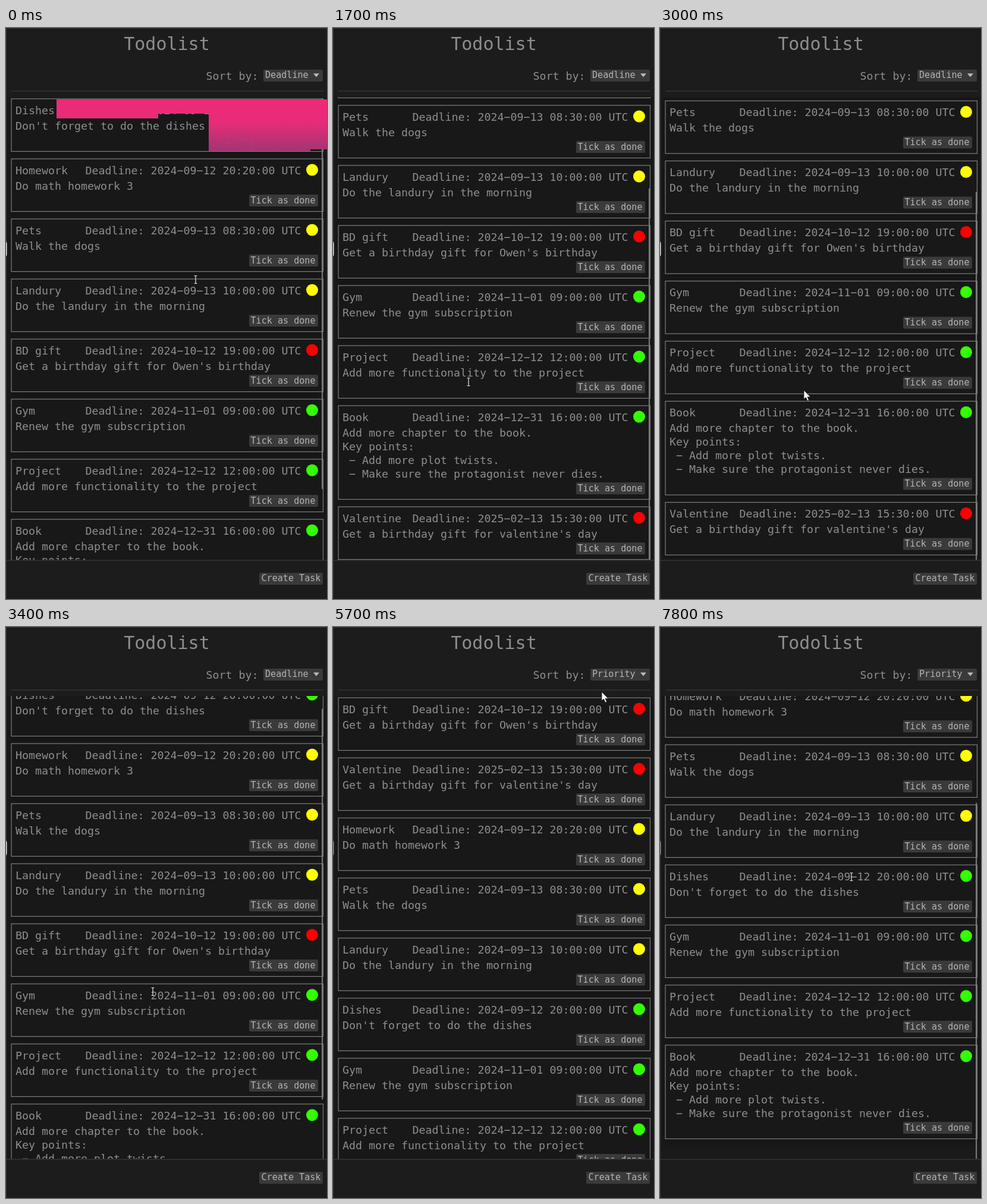
These frames come from a looping animation (540x960 px, 8000 ms). An HTML page:

```html
<!DOCTYPE html>
<html lang="en">
<head>
<meta charset="utf-8">
<title>Todolist</title>
<style>
  html, body { margin: 0; width: 100%; height: 100%; overflow: hidden; background: #1c1c1c; }
  svg { display: block; width: 540px; height: 960px; }
  text { font: 18.27px "DejaVu Sans Mono", monospace; fill: #8e8e8e; white-space: pre; }
  .title { font-size: 30px; text-anchor: middle; }
  .label { font-size: 15.1px; fill: #b4b4b4; }
  .button { fill: #3a3a3a; }
  .frame { fill: #181818; stroke: #7e7e7e; stroke-width: 1.2; filter: drop-shadow(0 5px 6px rgba(0, 0, 0, .25)); }
  .menu text { font: 18px Inter, sans-serif; fill: #e4e4e4; }
</style>
</head>
<body>
<svg viewBox="0 0 540 960">
  <defs>
    <clipPath id="view"><rect y="116" width="540" height="778"/></clipPath>
    <linearGradient id="pink" x1="0" y1="0" x2="0" y2="1">
      <stop offset="0" stop-color="#ee2a78"/>
      <stop offset=".45" stop-color="#e62c78"/>
      <stop offset="1" stop-color="#a03672"/>
    </linearGradient>
  </defs>
  <rect width="540" height="960" fill="#1c1c1c"/>
  <rect y="116" width="540" height="778" fill="#1a1a1a"/>
  <path d="M.5 960V.5H540" fill="none" stroke="#323232"/>
  <path id="notch" d="M0 359q1.5 1 1.5 4v17q0 3-1.5 4z"/>

  <text class="title" x="270.5" y="37">Todolist</text>
  <text x="336.5" y="87">Sort by:</text>
  <rect class="button" x="433" y="70" width="100" height="20" rx="2"/>
  <text class="label" id="choice" x="436" y="84"></text>
  <path d="M517 76.5h10l-5 6z" fill="#bcbcbc"/>
  <path d="M9 106H534" stroke="#343434" stroke-width="1.6"/>

  <g clip-path="url(#view)">
    <g id="list"></g>
    <rect id="thumb" x="531" width="2.2" height="657" rx="1" fill="#777"/>
  </g>

  <path d="M0 895H540" stroke="#343434" stroke-width="1.6"/>
  <rect class="button" x="426" y="916" width="107" height="20" rx="2"/>
  <text class="label" x="429.5" y="930">Create Task</text>

  <g id="glitch">
    <path d="M85 120H540V204H512V207H341V144H256V152H85Z" fill="url(#pink)"/>
  </g>
  <g id="menu" class="menu">
    <rect x="404" y="55.5" width="130" height="76" rx="8" fill="#2b2b2b" stroke="#505050"/>
    <rect id="pick" x="410" width="118" height="31" rx="5" fill="#2a62c8"/>
    <path d="M415 79l4 5 7-11" fill="none" stroke="#e4e4e4" stroke-width="2"/>
    <text x="436" y="85">Deadline</text>
    <text x="436" y="116">Priority</text>
  </g>
  <path id="arrow" d="M0 0V15L3.5 12L6 18L8.5 17L6.2 11.3H11Z" fill="#fff" stroke="#111" stroke-width=".8"/>
  <path id="beam" d="M-2.5-6.5H2.5M0-6.5V6.5M-2.5 6.5H2.5" fill="none" stroke="#e8e8e8" stroke-width="1.2"/>
</svg>
<script>
const LOOP = 8000, STEP = 100, TOP = 119;
const RED = '#ff0000', YELLOW = '#ffff00', GREEN = '#33ff00';
const $ = id => document.getElementById(id);

function add(parent, tag, attrs, text) {
  const el = document.createElementNS('http://www.w3.org/2000/svg', tag);
  for (const key in attrs) el.setAttribute(key, attrs[key]);
  if (text) el.textContent = text;
  return parent.appendChild(el);
}

const tasks = [
  ['Dishes', '2024-09-12 20:00:00', GREEN, "Don't forget to do the dishes"],
  ['Homework', '2024-09-12 20:20:00', YELLOW, 'Do math homework 3'],
  ['Pets', '2024-09-13 08:30:00', YELLOW, 'Walk the dogs'],
  ['Landury', '2024-09-13 10:00:00', YELLOW, 'Do the landury in the morning'],
  ['BD gift', '2024-10-12 19:00:00', RED, "Get a birthday gift for Owen's birthday"],
  ['Gym', '2024-11-01 09:00:00', GREEN, 'Renew the gym subscription'],
  ['Project', '2024-12-12 12:00:00', GREEN, 'Add more functionality to the project'],
  ['Book', '2024-12-31 16:00:00', GREEN,
    'Add more chapter to the book.\nKey points:\n - Add more plot twists.\n - Make sure the protagonist never dies.'],
  ['Valentine', '2025-02-13 15:30:00', RED, "Get a birthday gift for valentine's day"]
];

// The interface font has wide hyphens.
const wide = s => s.replace(/-/g, '\u2212');

const cards = tasks.map(([name, date, color, note]) => {
  const el = add($('list'), 'g', {});
  const lines = note.split('\n');
  const extra = (lines.length - 1) * 23;
  add(el, 'rect', { class: 'frame', x: 9, y: 0, width: 524.5, height: 88.5 + extra });
  add(el, 'text', { x: 16, y: 25.5 }, name);
  add(el, 'text', { x: 133.5, y: 25.5 }, wide(`Deadline: ${date} UTC`));
  add(el, 'circle', { cx: 515, cy: 18.5, r: 10, fill: color });
  lines.forEach((line, i) => add(el, 'text', { x: 16, y: 51.5 + i * 23 }, wide(line)));
  add(el, 'rect', { class: 'button', x: 409, y: 60 + extra, width: 116, height: 20, rx: 2 });
  add(el, 'text', { class: 'label', x: 411.5, y: 74.5 + extra }, 'Tick as done');
  return { el, color, pitch: 101 + extra };
});

const rank = [RED, YELLOW, GREEN];
const orders = {
  Deadline: cards,
  Priority: [...cards].sort((a, b) => rank.indexOf(a.color) - rank.indexOf(b.color))
};

let seed = 7;
const random = () => (seed = seed * 16807 % 2147483647) / 2147483647;
for (let i = 0; i < 16; i++)
  add($('glitch'), 'rect', { x: 348 + random() * 72, y: 172 + random() * 28, width: 1, height: 1, fill: '#6f8a80' });

// Rows: time, value, ...
const scroll = [
  [0, 0], [1200, 0], [1300, 28], [1400, 82], [1500, 131], [1600, 167], [1700, 191], [1800, 198], [1900, 200],
  [2900, 200], [3000, 198.5], [3100, 170], [3200, 116], [3300, 62], [3400, 24], [3500, 6], [3600, 0],
  [7400, 0], [7500, 18], [7600, 92], [7700, 172], [7800, 224]
];
const cursor = [
  [0, 319, 423], [100, 303, 450], [300, 248, 550], [500, 218, 595], [600, 218, 595], [700, 216, 596],
  [900, 217, 596], [1100, 227, 594], [1300, 226, 594], [1400, 228, 595],
  [2000, 228, 595], [2100, 227, 595], [2200, 227, 595], [2300, 238, 601], [2900, 238, 601],
  [3000, 242, 609], [3300, 247, 613], [3500, 247, 613], [3600, 270, 520], [3700, 335, 260], [3800, 385, 112],
  [4100, 465, 72], [4300, 480, 72], [4700, 480, 72], [4900, 466, 88], [5100, 453, 114],
  [5300, 453, 114], [5400, 454, 115], [5500, 452, 109], [5700, 452, 109],
  [6200, 432, 160], [6600, 400, 250], [7000, 330, 395], [7200, 310, 425], [7400, 322, 420]
];
const beamSpans = [[0, 99], [1700, 2000], [3300, 3400], [7300, 8000]];
const thumbFade = [[0, 1], [3900, 1], [4300, 0], [7000, 0], [7400, 1]];

function sample(rows, t) {
  const i = rows.findIndex(row => row[0] > t);
  if (i < 0) return rows[rows.length - 1].slice(1);
  const a = rows[i - 1], b = rows[i], k = (t - a[0]) / (b[0] - a[0]);
  return a.slice(1).map((v, n) => v + (b[n + 1] - v) * k);
}

const show = (id, on) => $(id).style.display = on ? '' : 'none';
const place = (el, x, y) => el.setAttribute('transform', `translate(${x} ${y})`);

function sortBy(mode) {
  if ($('choice').textContent === mode) return;
  $('choice').textContent = mode;
  let y = TOP;
  for (const card of orders[mode]) {
    place(card.el, 0, y);
    y += card.pitch;
  }
}

function draw(t) {
  sortBy(t < 5700 ? 'Deadline' : 'Priority');
  const [offset] = sample(scroll, t);
  place($('list'), 0, -offset);
  $('thumb').setAttribute('y', 118.5 + offset * 0.79);
  $('thumb').setAttribute('opacity', sample(thumbFade, t)[0]);

  const [x, y] = sample(cursor, t);
  const beam = beamSpans.some(([from, to]) => t >= from && t <= to);
  show('beam', beam);
  show('arrow', !beam);
  place($(beam ? 'beam' : 'arrow'), x, y);

  show('glitch', t < 100);
  show('menu', t >= 4800 && t < 5100);
  $('pick').setAttribute('y', t < 5000 ? 63 : 94);
  $('notch').setAttribute('fill', t < 4800 ? '#e6e6e6' : '#8c8c8c');
}

const start = performance.now();
function tick() {
  const t = (performance.now() - start) % LOOP;
  draw(Math.floor(t / STEP) * STEP);
  requestAnimationFrame(tick);
}
tick();
</script>
</body>
</html>
```
